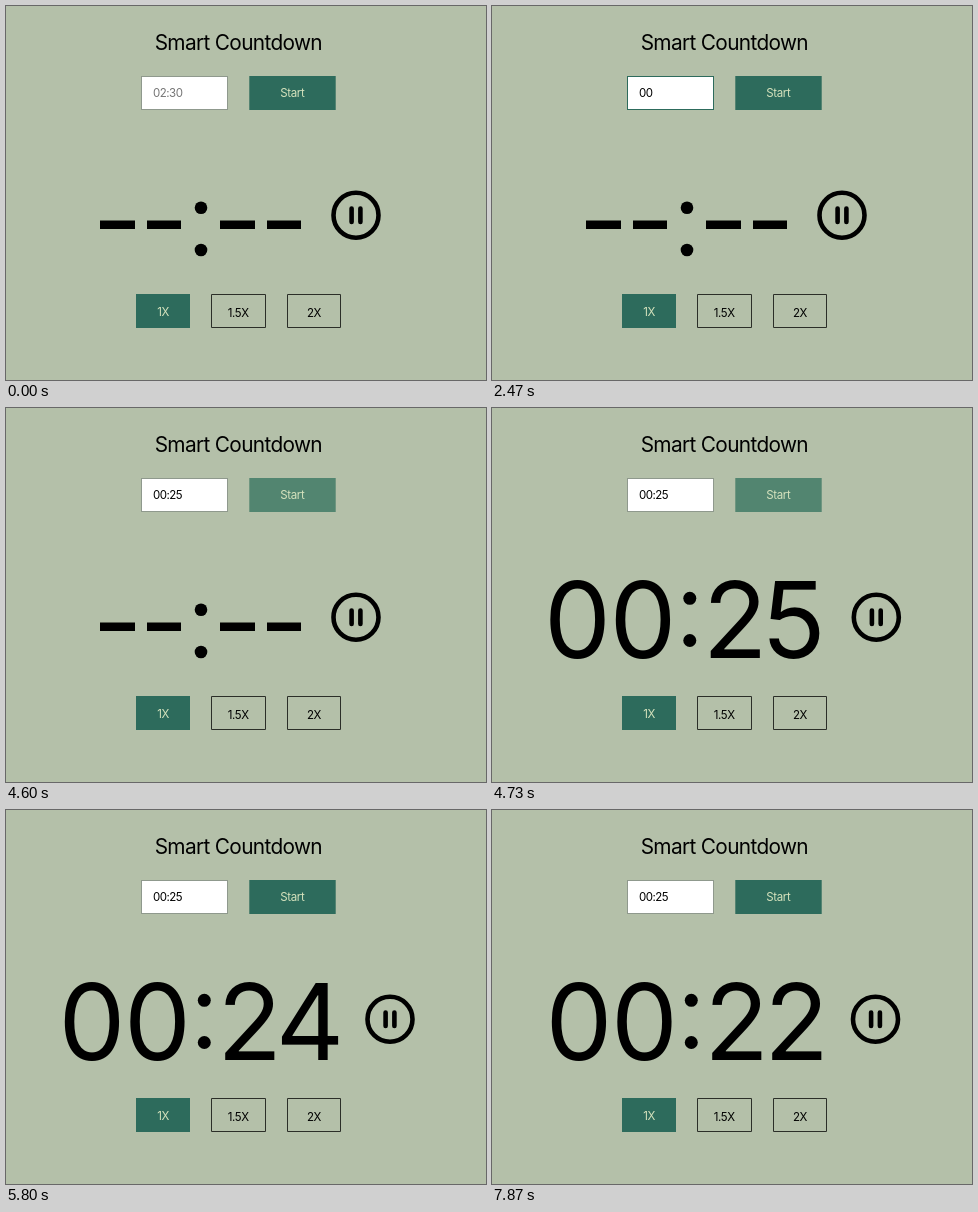
An HTML page that plays this animation: 480x374 px, repeating every 8000 ms.

```html
<!DOCTYPE html>
<html lang="en">
<meta charset="utf-8">
<title>Countdown</title>
<style>
html, body { margin: 0; width: 100%; height: 100%; overflow: hidden; background: #b4c0a9 }
svg { display: block; width: 480px; height: 374px; font: 11.5px Inter, sans-serif; letter-spacing: -.4px }
.mid { text-anchor: middle }
.on { fill: #2d6b5c }
.pale { fill: #d5e2bd }
.box { fill: none; stroke: #2b2e28 }
#title { font-size: 20.8px; letter-spacing: -.65px }
#entry { letter-spacing: -.5px }
#clock { font-size: 106px; letter-spacing: -1.3px }
#secs { letter-spacing: -4.5px }
</style>
<svg viewBox="0 0 480 374">
  <text id="title" class="mid" x="232.3" y="44">Smart Countdown</text>

  <rect id="field" x="135.5" y="70.5" width="86" height="33" fill="#fff"/>
  <text id="entry" x="147" y="91"></text>
  <path id="caret" d="M0 80.5v13" stroke="#000"/>
  <rect id="start" x="243.3" y="70" width="86.4" height="34"/>
  <text class="mid pale" x="286.3" y="91">Start</text>

  <g id="blank">
    <path d="M94 218.7h35m12 0h34m39 0h35m12 0h34" stroke="#000" stroke-width="8.6"/>
    <circle cx="195" cy="201.7" r="6.3"/><circle cx="195" cy="244" r="6.3"/>
  </g>
  <g id="clock">
    <text y="250">00</text>
    <circle cx="145.8" cy="190.3" r="6.5"/><circle cx="145.8" cy="232.5" r="6.5"/>
    <text id="secs" x="158.7" y="250"></text>
  </g>
  <g id="pause" fill="none" stroke="#000" stroke-width="4.6">
    <circle r="22.5"/>
    <path d="M-4.4-6.7V6.7M4.4-6.7V6.7" stroke-linecap="round"/>
  </g>

  <rect class="on" x="130" y="288" width="54" height="34"/>
  <path class="box" d="M205.5 288.5h54v33h-54zM281.5 288.5h53v33h-53z"/>
  <g class="mid">
    <text class="pale" x="157" y="310">1X</text>
    <text x="232.3" y="311">1.5X</text>
    <text x="308" y="311">2X</text>
  </g>
</svg>
<script>
const $ = id => document.getElementById(id);
const set = (id, attrs) => { for (const k in attrs) $(id).setAttribute(k, attrs[k]); };
const show = (id, on) => set(id, { visibility: on ? 'visible' : 'hidden' });

const FOCUS = 1330, BLUR = 4600, RUN = 4730;
// key times, and when the caret blinks off after each burst
const keys = [1930, 2000, 2730, 3670, 3800];
const caretOff = [[2470, 2730], [3070, 3670], [4200, BLUR]];
const caretX = [147.5, 154.5, 161, 164, 170, 176.5];
// left edge of the digits and centre of the pause sign, by remaining seconds
const layout = { 25: [52, 384.3], 24: [52.5, 384], 23: [51.5, 385], 22: [53.5, 383.5] };

function draw(t) {
  const typed = keys.filter(k => t >= k).length;
  const focus = t >= FOCUS && t < BLUR;
  const press = t >= 4400 && t < 4870;
  const running = t >= RUN;

  $('entry').textContent = typed ? '00:25'.slice(0, typed) : '02:30';
  set('entry', { fill: typed ? '#000' : '#757575' });
  set('field', { stroke: focus ? '#2d6b5c' : '#8f998d' });
  set('caret', { transform: `translate(${caretX[typed]})` });
  show('caret', focus && !caretOff.some(([a, b]) => t >= a && t < b));
  set('start', { fill: press ? '#528570' : '#2d6b5c' });

  show('blank', !running);
  show('clock', running);
  const left = 25 - Math.max(0, Math.floor((t - RUN) / 1000));
  const [x, px] = layout[left];
  $('secs').textContent = left;
  set('clock', { transform: `translate(${x})` });
  set('pause', { transform: `translate(${running ? px : 350} 209.3)` });
}

function tick(now) {
  draw(now % 8000);
  requestAnimationFrame(tick);
}
requestAnimationFrame(tick);
</script>
</html>
```
